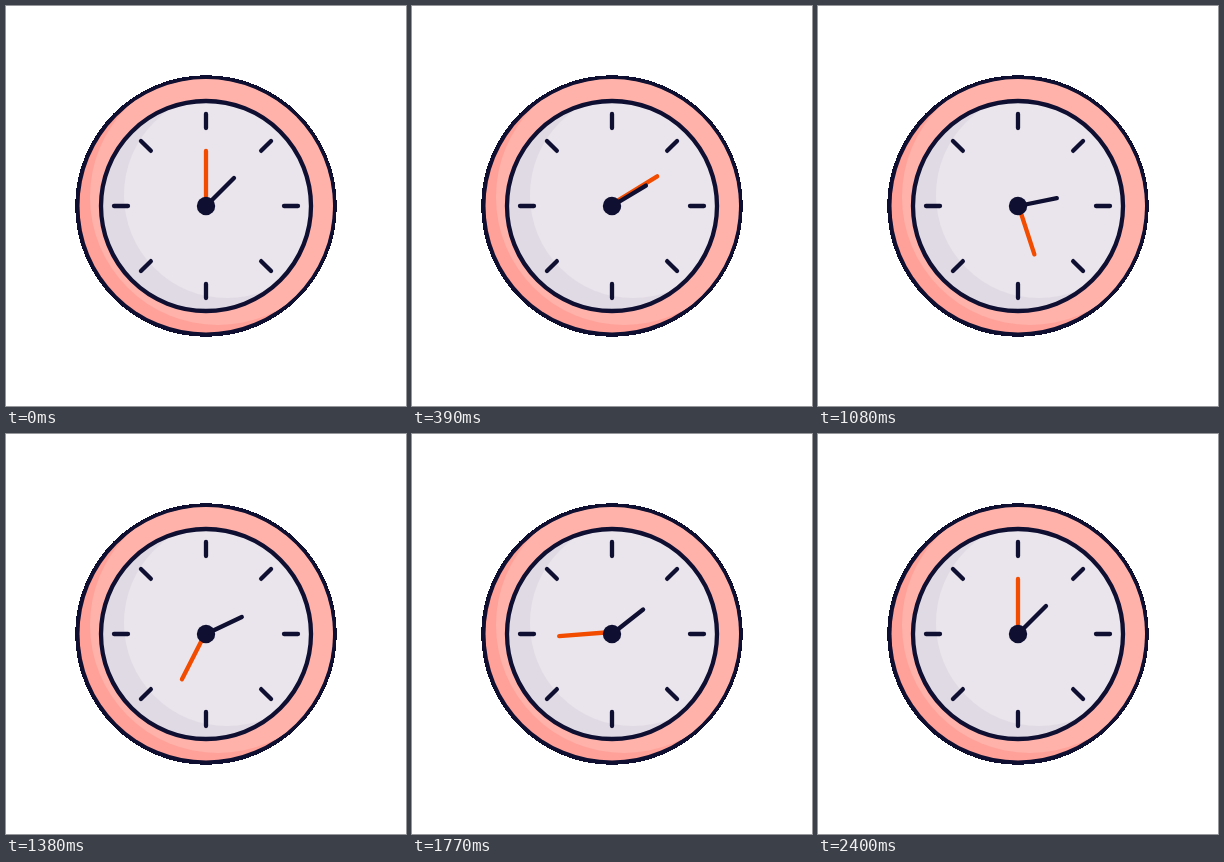
Recreate the animation shown at these times as an HTML page. Size 400 px wide and 400 px high, loop 4.46 s.

```html
<!DOCTYPE html>
<html lang="en">
<head>
<meta charset="utf-8">
<title>Clock</title>
<style>
  html, body { margin: 0; width: 100%; height: 100%; overflow: hidden; background: #fff; }
  svg { display: block; width: 100%; height: 100%; }
  .line { stroke: #0f0f32; stroke-width: 4.3; stroke-linecap: round; fill: none; }
</style>
</head>
<body>
<svg viewBox="0 0 400 400">
  <defs>
    <clipPath id="rimClip"><circle cx="200" cy="200" r="127"/></clipPath>
    <clipPath id="faceClip"><circle cx="200" cy="200" r="105"/></clipPath>
  </defs>
  <circle cx="200" cy="200" r="130.8" fill="#0f0f32" shape-rendering="crispEdges"/>
  <circle cx="200" cy="200" r="126.5" fill="#ffa198"/>
  <circle cx="212" cy="191" r="128" fill="#ffb2aa" clip-path="url(#rimClip)"/>
  <circle cx="200" cy="200" r="105" fill="#e0dae4"/>
  <circle cx="221" cy="189" r="103" fill="#eae5ec" clip-path="url(#faceClip)"/>
  <circle class="line" cx="200" cy="200" r="105"/>
  <g id="ticks"></g>
  <path id="minute" class="line" d="M200 198V145" style="stroke:#f24c00"/>
  <path id="hour" class="line" d="M200 200V160.4"/>
  <circle cx="200" cy="200" r="9.2" fill="#0f0f32"/>
</svg>
<script>
  const LOOP = 4460, TURN = 2400, STEP = 30, PEAK = 960, SWING = 40;
  const minute = document.getElementById('minute');
  const hour = document.getElementById('hour');

  document.getElementById('ticks').innerHTML = Array.from({ length: 8 }, (_, i) =>
    `<path class="line" d="M200 108V122" transform="rotate(${i * 45} 200 200)"/>`).join('');

  // Cubic Bezier from 0 to 1 with inner values a and b
  const ease = (u, a, b) =>
    3 * u * (1 - u) ** 2 * a + 3 * u * u * (1 - u) * b + u ** 3;

  function hourAngle(t) {
    const lift = t < PEAK
      ? ease(t / PEAK, 0.16, 0.72)
      : 1 - ease((t - PEAK) / (TURN - PEAK), 0.67, 1.05);
    return 45 + SWING * lift;
  }

  function draw(time) {
    const t = Math.min(TURN, Math.floor((time % LOOP) / STEP) * STEP);
    minute.setAttribute('transform', `rotate(${t / TURN * 360} 200 198)`);
    hour.setAttribute('transform', `rotate(${hourAngle(t)} 200 200)`);
  }

  const start = performance.now();
  function tick() {
    draw(performance.now() - start);
    requestAnimationFrame(tick);
  }
  tick();
</script>
</body>
</html>
```
